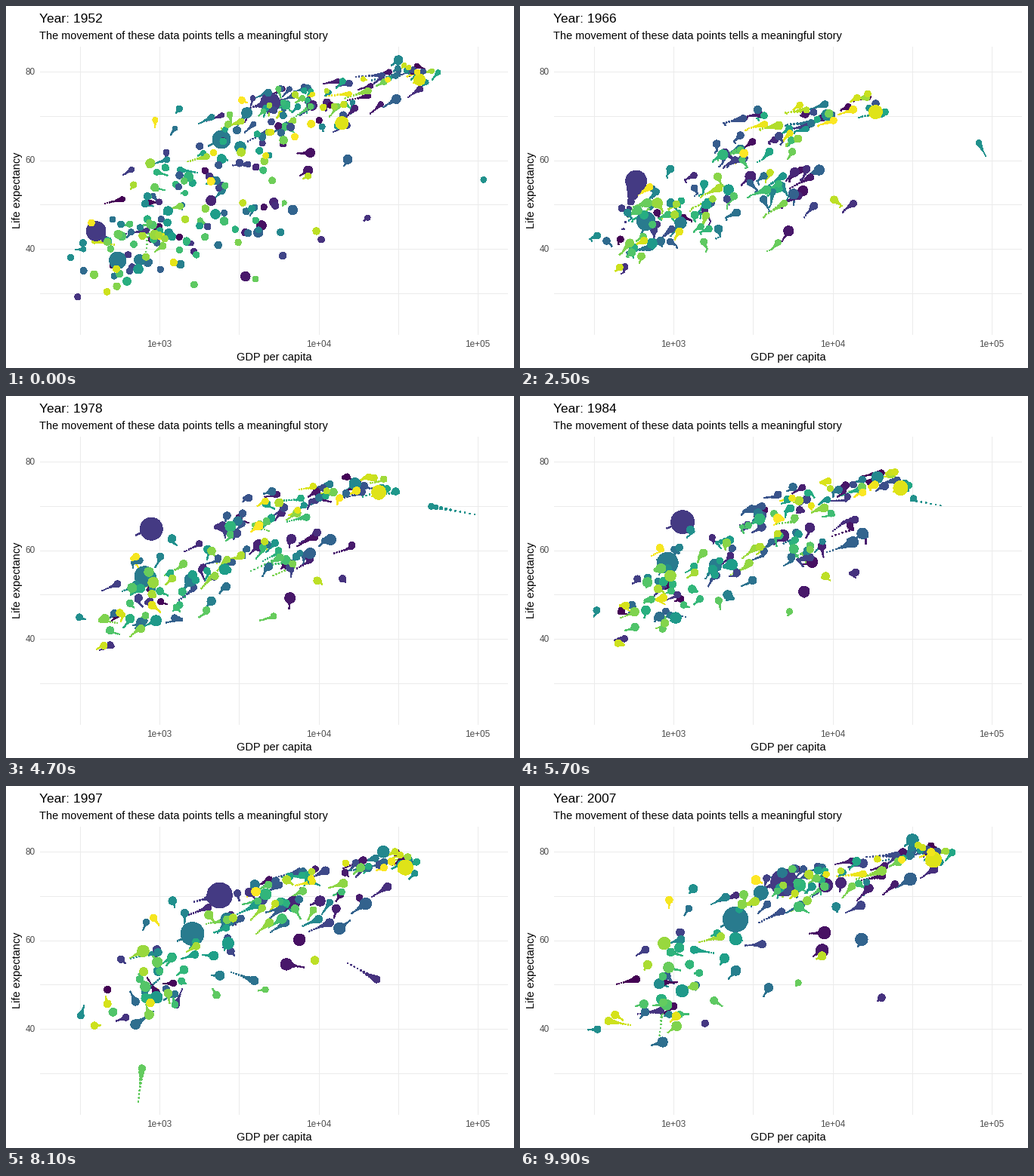
Animation of 672 by 480 pixels, one loop 10000 ms. Source, as a matplotlib script:

```python
import numpy as np
import matplotlib.pyplot as plt
from matplotlib.animation import FuncAnimation

W, H, DPI = 672, 480, 96
FRAMES, WAKE = 100, 9
COUNT, STEPS = 142, np.arange(12)   # one step = five years
T = STEPS / 11
rng = np.random.default_rng(21)

plt.rcParams["font.family"] = ["Liberation Sans", "DejaVu Sans"]

# hue, population at start and end (millions), then (step, income, life)
LANDMARKS = (
    (24, 556, 1319, (0, 400, 44), (2, 488, 44.5), (3, 613, 58.4), (4, 677, 63.1),
     (8, 1656, 68.7), (11, 4959, 73)),
    (58, 372, 1110, (0, 547, 37.4), (6, 856, 56.6), (11, 2452, 64.7)),
    (134, 158, 301, (0, 13990, 68.4), (11, 42952, 78.2)),
    (66, 86, 127, (0, 3217, 63), (4, 14779, 73.4), (11, 31656, 82.6)),
    (14, 57, 190, (0, 2109, 50.9), (11, 9066, 72.4)),
    (59, 82, 224, (0, 750, 37.5), (11, 3541, 70.7)),
    (71, .2, 2.5, (0, 108382, 55.6), (3, 80895, 64.6), (4, 109348, 67.7),
     (6, 31354, 71.3), (11, 47307, 77.6)),
    (107, 2.5, 9, (0, 493, 40), (6, 882, 46), (8, 737, 23.6), (11, 863, 46)),
)

# members, growth, (log income, life) at start and end, spread, end spread, ease
REGIONS = (
    (19, 1.3, (3.88, 68.5), (4.50, 79.8), (.16, 2.5), (.10, 1.1), 1.0),   # rich
    (14, 1.3, (3.48, 61.5), (4.08, 75.0), (.20, 4.5), (.22, 2.2), .55),   # industrial
    (24, 2.5, (3.42, 52.5), (3.85, 73.0), (.24, 8.0), (.26, 3.0), .8),    # middle
    (26, 3.0, (3.18, 46.0), (3.78, 71.0), (.30, 6.5), (.42, 4.5), .85),   # rising
    (42, 3.0, (2.93, 39.5), (3.06, 55.0), (.24, 5.0), (.28, 6.0), .65),   # poor
    (9, 3.0, (3.62, 40.0), (3.92, 61.0), (.25, 8.0), (.32, 9.0), .6),     # resources
)

tracks = {}   # hue -> log income, life, population at every step

for hue, pop0, pop1, *points in LANDMARKS:
    keys, income, life = zip(*points)
    tracks[hue] = (np.interp(STEPS, keys, np.log10(income)),
                   np.interp(STEPS, keys, life),
                   np.geomspace(pop0, pop1, 12))


def offset():
    """Random place in a region; richer members also live longer."""
    a, b = rng.uniform(-1.7, 1.7, 2)
    return np.array([a, .5 * a + .75 * b])


def member(start, end, spread0, spread1, ease):
    z0 = offset()
    z1 = .7 * z0 + .55 * offset()
    x = start[0] + (end[0] - start[0]) * T + rng.normal(0, .04, 12)
    y = start[1] + (end[1] - start[1]) * T ** ease + rng.normal(0, .3, 12)
    x += z0[0] * spread0[0] * (1 - T) + z1[0] * spread1[0] * T
    y += z0[1] * spread0[1] * (1 - T) + z1[1] * spread1[1] * T
    if rng.random() < .3:   # income boom and bust
        x += rng.uniform(-.15, .25) * np.exp(-((STEPS - rng.uniform(4, 7)) / 2) ** 2)
    if end[1] < 65 and rng.random() < .35:   # late epidemic
        y -= rng.uniform(4, 13) * np.clip((STEPS - 7) / 3, 0, 1) ** 1.5
    return x, y


free = list(rng.permutation([h for h in range(COUNT) if h not in tracks]))
for n, growth, *shape in REGIONS:
    for _ in range(n):
        pop = min(4.5 * rng.lognormal(0, 1.1), 45)
        tracks[free.pop()] = (*member(*shape), np.geomspace(pop, pop * growth, 12))

hues = sorted(tracks)
when = np.arange(FRAMES) / 9
data = np.array([[np.interp(when, STEPS, row) for row in tracks[h]] for h in hues])
X, Y = data[:, 0].T, data[:, 1].T
SIZE = 2 + 10 * np.sqrt(data[:, 2].T / 1319)

fig = plt.figure(figsize=(W / DPI, H / DPI), dpi=DPI, facecolor="white")
LEFT, RIGHT, TOP, BOTTOM = 44.7, 664.1, 54.4, 435.7
ax = fig.add_axes([LEFT / W, 1 - BOTTOM / H, (RIGHT - LEFT) / W, (BOTTOM - TOP) / H])
ax.set_xlim(2.2487, 5.1887)
ax.set_ylim(20.649, 85.553)
ax.axis("off")
grid = dict(color="#EBEBEB", lw=.75, zorder=0)
for gx in np.arange(2.5, 5.1, .5):
    ax.axvline(gx, **grid)
for gy in range(30, 90, 10):
    ax.axhline(gy, **grid)


def text(x, y, s, size=10.9, color="black", **kw):
    return fig.text(x / W, 1 - y / H, s, fontsize=size, color=color,
                    va="baseline", **kw)


title = text(44.5, 22, "", 13)
text(44.5, 44, "The movement of these data points tells a meaningful story")
text(355, 470, "GDP per capita", ha="center")
text(19, 244.5, "Life expectancy", ha="center", rotation=90, rotation_mode="anchor")
for e in (3, 4, 5):
    text(202.6 + 210.6 * (e - 3), 452, f"1e+0{e}", 8.8, "#4D4D4D", ha="center")
for v in (40, 60, 80):
    text(38.5, 91 + (80 - v) * 5.875, str(v), 8.8, "#4D4D4D", ha="right")

lags = np.arange(WAKE, -1, -1)   # oldest wake first, heads on top
shrink = (1 - lags / WAKE)[:, None] ** 3
colors = plt.get_cmap("viridis")(np.array(hues) / (COUNT - 1))
blank = np.zeros(lags.size * COUNT)
dots = ax.scatter(blank, blank, c=np.tile(colors, (lags.size, 1)), linewidths=0,
                  antialiased=False, clip_on=False, zorder=2)


def update(i):
    past = (i - lags) % FRAMES
    dots.set_offsets(np.column_stack([X[past].ravel(), Y[past].ravel()]))
    diameter = 2.134 * SIZE[past] * shrink + 1.1
    dots.set_sizes(diameter.ravel() ** 2)
    title.set_text(f"Year: {round(1952 + 55 * i / (FRAMES - 1))}")
    return dots, title


anim = FuncAnimation(fig, update, frames=FRAMES, interval=100,
                     init_func=lambda: update(0), repeat=True, repeat_delay=0)
plt.show()
```
